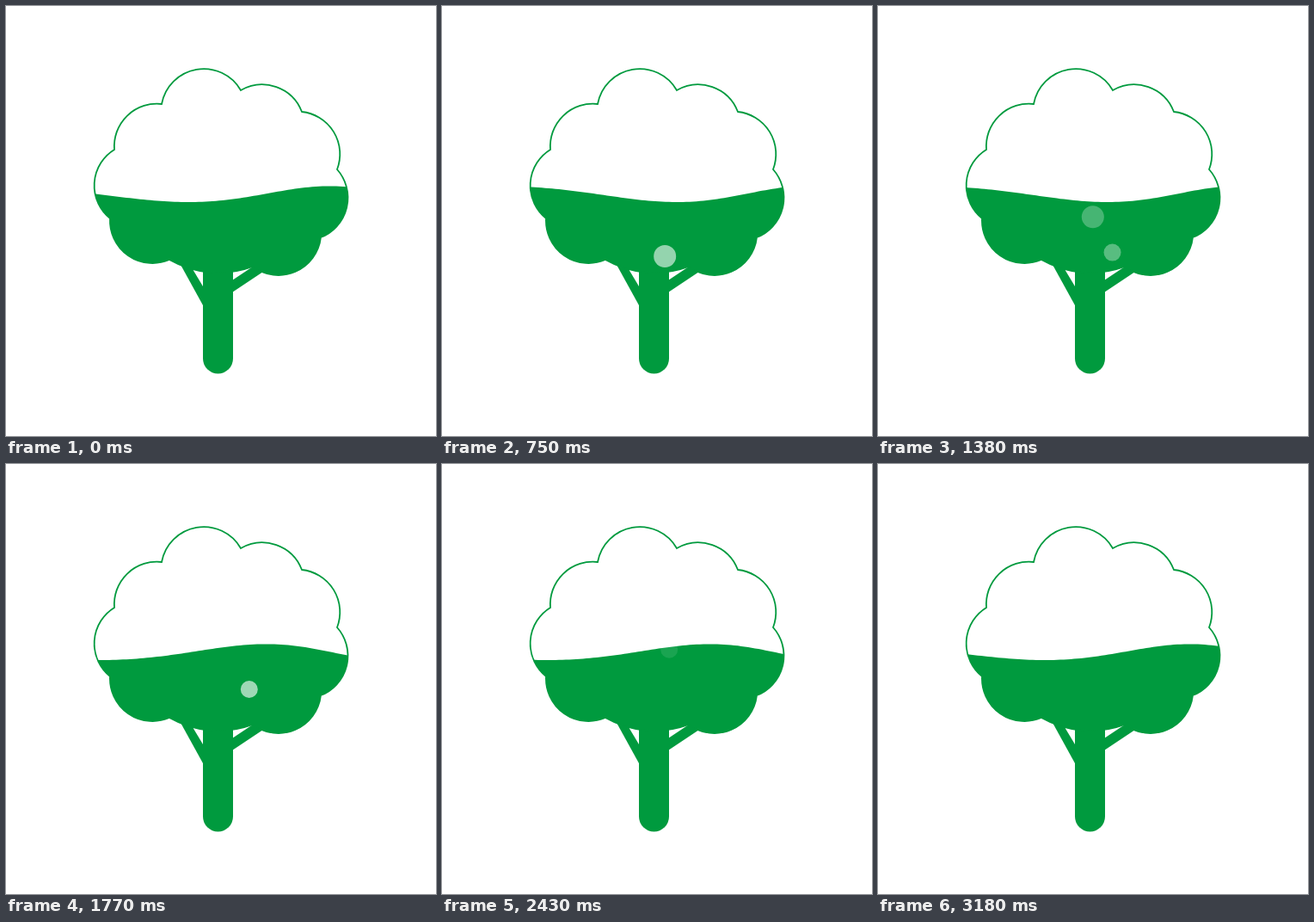
An HTML page that plays this animation: 500 by 500 pixels, repeating every 3210 ms.

```html
<!DOCTYPE html>
<html lang="en">
<head>
<meta charset="utf-8">
<title>Filling tree</title>
<style>
  html, body { margin: 0; width: 100%; height: 100%; overflow: hidden; background: #fff; }
  svg { display: block; width: 100vw; height: 100vh; }
  .leaf { fill: #009a3e; }
  .line { fill: none; stroke: #009a3e; stroke-width: 1.8; }
</style>
</head>
<body>
<svg viewBox="0 0 500 500">
  <defs>
    <path id="crown" d="M126 167 A49.5 49.5 0 0 1 181 114 A49.7 49.7 0 0 1 273 98
      A49.5 49.5 0 0 1 344 123 A49.5 49.5 0 0 1 385 190 A49.5 49.5 0 0 1 366 269
      A49.5 49.5 0 0 1 287 303 A115 115 0 0 1 190 295 A49.5 49.5 0 0 1 121 247
      A49 49 0 0 1 126 167Z"/>
    <clipPath id="inside"><use href="#crown"/></clipPath>
  </defs>
  <g class="leaf">
    <path d="M229 300H264V410A17.5 17.5 0 0 1 229 410Z"/>
    <path d="M202 299L229 348V326L217 306Z"/>
    <path d="M287 303L263 319V333L299 309Z"/>
  </g>
  <path id="wave" class="leaf" clip-path="url(#inside)"/>
  <use href="#crown" class="line"/>
  <g id="bubbles" fill="#fff"></g>
</svg>
<script>
  const LOOP = 3210, STEP = 30, CYCLES = 5, LIFE = 1500;
  const wave = document.getElementById('wave');
  const bubbles = [
    { start: 150, x: 235.5, y: 316.5, r: 13 },
    { start: 1050, x: 257.5, y: 296, r: 10 }
  ];

  for (const b of bubbles) {
    b.el = document.createElementNS('http://www.w3.org/2000/svg', 'circle');
    b.el.setAttribute('r', b.r);
    document.getElementById('bubbles').append(b.el);
  }

  // Ripples travel right and get slightly shorter on the way.
  function surface(x, t) {
    const s = x - 250;
    const phase = 0.64 + 0.0177 * s + 0.000017 * s * s;
    return 218.7 + 9.3 * Math.cos(phase - 2 * Math.PI * CYCLES * t / LOOP);
  }

  function drawWave(t) {
    let d = 'M100 330';
    for (let x = 100; x <= 400; x += 4) d += `L${x} ${surface(x, t).toFixed(2)}`;
    wave.setAttribute('d', d + 'V330Z');
  }

  function drawBubble(b, t) {
    const p = Math.min(1, Math.max(0, (t - b.start) / LIFE));
    const glow = Math.max(0, Math.sin(Math.PI * p));
    const sway = Math.sin(Math.PI * p ** 1.06);
    const rise = 0.1 * p + 2.07 * p ** 2 - 1.17 * p ** 3;
    b.el.setAttribute('cx', b.x + 25.5 * sway);
    b.el.setAttribute('cy', b.y - 86 * rise);
    b.el.setAttribute('opacity', p < 1 ? 0.62 * glow ** 1.3 : 0);
  }

  function draw() {
    const t = Math.floor(performance.now() % LOOP / STEP) * STEP;
    drawWave(t);
    for (const b of bubbles) drawBubble(b, t);
    requestAnimationFrame(draw);
  }
  draw();
</script>
</body>
</html>
```
